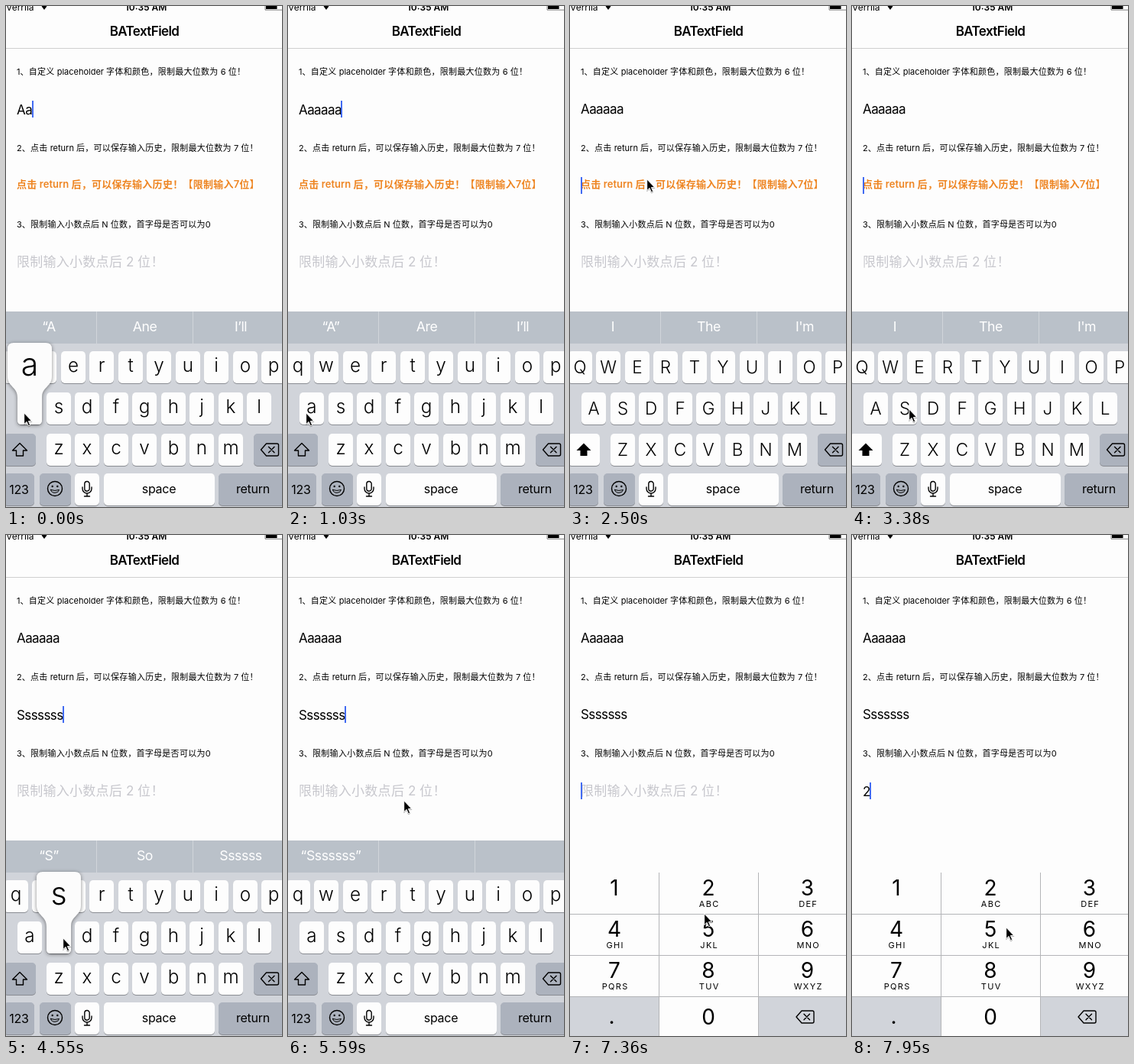
Recreate the animation shown at these times as an HTML page. Size 361x656 px, loop 8 s.

```html
<!DOCTYPE html>
<html lang="zh-CN">
<head>
<meta charset="utf-8">
<title>BATextField</title>
<style>
html, body { margin: 0; width: 100%; height: 100%; overflow: hidden; background: #fdfdfd; }
svg { display: block; width: 361px; height: 656px; }
text { font-family: Inter, "Noto Sans CJK SC", "Noto Sans CJK", sans-serif; white-space: pre; text-spacing-trim: space-all; }
.han { letter-spacing: .27px; }
.mid { text-anchor: middle; }
.field { font-size: 17px; letter-spacing: -.6px; }
.suggest { font-size: 17.7px; letter-spacing: -.45px; fill: #fff; }
.lower { font-size: 24.3px; font-weight: 350; }
.upper { font-size: 22.5px; font-weight: 350; }
.word { font-size: 16px; letter-spacing: -.25px; }
.digit { font-size: 28px; }
.abc { font-size: 11px; letter-spacing: 1.3px; }
.line { fill: none; stroke: #000; stroke-width: 1.4; stroke-linejoin: round; stroke-linecap: round; }
</style>
</head>
<body>
<svg id="stage" viewBox="0 0 361 656" xmlns="http://www.w3.org/2000/svg"></svg>
<script>
const LOOP = 8000;
const LEFT = 14;

const rect = (x, y, w, h, fill, more = '') =>
  `<rect x="${x}" y="${y}" width="${w}" height="${h}" fill="${fill}" ${more}/>`;
const text = (x, y, content, more = '') => `<text x="${x}" y="${y}" ${more}>${content}</text>`;
const path = (d, more) => `<path d="${d}" ${more}/>`;
const group = (id, content) => `<g id="${id}">${content}</g>`;

// Chinese runs are spaced slightly wider than Latin ones.
const mixed = (x, y, content, more) => text(x, y, content.replace(
  /[\u3000-\uffef]+/g, run => `<tspan class="han">${run}</tspan>`), more);

const key = (x, y, w, fill = '#fdfdfd') =>
  rect(x, y + 1, w, 42, '#898c92', 'rx="5"') + rect(x, y, w, 42, fill, 'rx="5"');

const backspace = (x, y) => `<g class="line" transform="translate(${x} ${y})">` +
  path('M-11.5 0L-4.5 -8H9.5Q11.5 -8 11.5 -6V6Q11.5 8 9.5 8H-4.5Z') +
  path('M-1.5 -3.8L6 3.8M6 -3.8L-1.5 3.8') + '</g>';

// Letter keys sit on whole pixels; each row starts at the given left edge.
const ROWS = [['qwertyuiop', -3.5, 452], ['asdfghjkl', 15.25, 506], ['zxcvbnm', 52.75, 560]];
const eachLetter = draw => ROWS.map(([letters, x, y]) =>
  [...letters].map((c, i) => draw(c, Math.round(x + 37.5 * i), y)).join('')).join('');
const SHIFT = 'M18 572.5L27.5 582H22.5V589H13.5V582H8.5Z';

function page() {
  const small = 'font-size="11"';
  return rect(0, 0, 361, 656, '#fdfdfd') + rect(0, 55, 361, 1, '#cfcfcf') +
    text(0, 5.5, 'Verrila', 'font-size="12"') +
    path('M45.5 -1A7 7 0 0 1 54.5 -1L50 5Z', '') +
    path('M45 1A7.2 7.2 0 0 1 55 1', 'fill="none" stroke="#fdfdfd" stroke-width="1"') +
    text(183, 5.5, '10:35 AM', 'class="mid" font-size="12" font-weight="600"') +
    rect(340, 0, 14.5, 4, '#000') + path('M339 0V5.2H361', 'fill="none" stroke="#000" stroke-width=".5"') +
    text(181, 39, 'BATextField', 'class="mid" font-size="17" font-weight="600" letter-spacing="-.6"') +
    mixed(LEFT, 90, '1、自定义 placeholder 字体和颜色，限制最大位数为 6 位！', small) +
    mixed(LEFT, 190, '2、点击 return 后，可以保存输入历史，限制最大位数为 7 位！', small) +
    mixed(LEFT, 290, '3、限制输入小数点后 N 位数，首字母是否可以为0', small) +
    group('hint2', mixed(LEFT, 237.5, '点击 return 后，可以保存输入历史！【限制输入7位】',
      'font-size="13" font-weight="600" fill="#ee8522"')) +
    group('hint3', mixed(LEFT, 341.3, '限制输入小数点后 2 位！', 'font-size="17" fill="#c7c7cd"')) +
    [1, 2, 3].map(i => text(LEFT, 0, '', `id="field${i}" class="field"`)).join('') +
    rect(0, 0, 2, 22, '#426bf2', 'id="caret"');
}

function letterBoard() {
  const dark = '#acb2bd';
  const label = (x, y, content) => text(x, y, content, 'class="mid word"');
  const mic = path('M106 622.5A3.2 3.2 0 0 1 109.2 625.7V632A3.2 3.2 0 0 1 102.8 632V625.7A3.2 3.2 0 0 1 106 622.5Z' +
    'M100 630V632A6 6 0 0 0 112 632V630M106 638V642M102.5 642H109.5', 'class="line"');
  const smile = '<circle cx="64" cy="632" r="9.5" class="line"/>' +
    '<circle cx="60.7" cy="629" r="1.2"/><circle cx="67.3" cy="629" r="1.2"/>' +
    path('M58.5 633.5Q64 635.5 69.5 633.5A5.6 4.8 0 0 1 58.5 633.5Z', 'class="line" style="stroke-width:1"');
  return rect(0, 400, 361, 256, '#d1d4da') + rect(0, 400, 361, 42, '#bac1c9') +
    rect(118, 400, 1, 42, '#d1d5da') + rect(244, 400, 1, 42, '#d1d5da') +
    [56, 181.5, 307].map((x, i) => text(x, 426, '', `id="suggest${i}" class="mid suggest"`)).join('') +
    eachLetter((c, x, y) => key(x, y, 32)) +
    group('lower', eachLetter((c, x, y) => text(x + 16, y + 27.2, c, 'class="mid lower"')) +
      key(-3, 560, 42, dark) + path(SHIFT, 'class="line"')) +
    group('upper', eachLetter((c, x, y) => text(x + 16, y + 29.3, c.toUpperCase(), 'class="mid upper"')) +
      key(-3, 560, 42) + path(SHIFT, '')) +
    key(324, 560, 42, dark) + backspace(345, 581) +
    key(-3, 612, 40, dark) + label(17, 639, '123') +
    key(44, 612, 41, dark) + smile +
    key(90, 612, 32) + mic +
    key(128, 612, 145) + label(200, 638, 'space') +
    key(278, 612, 90, dark) + label(323, 638, 'return');
}

function numberBoard() {
  const grey = '#d1d4da', rule = '#b4b5b8';
  const columns = [58, 181, 310.5];
  const captions = ['', 'ABC', 'DEF', 'GHI', 'JKL', 'MNO', 'PQRS', 'TUV', 'WXYZ'];
  const keys = captions.map((caption, i) => {
    const x = columns[i % 3], y = 442 + 54 * Math.floor(i / 3);
    return text(x, y + 30, i + 1, 'class="mid digit"') + text(x + 1.2, y + 45, caption, 'class="mid abc"');
  }).join('');
  return rect(0, 442, 361, 214, '#fdfdfd') + rect(117, 442, 129, 54, grey, 'id="pressed"') +
    rect(0, 605, 116, 51, grey) + rect(247, 605, 114, 51, grey) +
    [496, 550, 604].map(y => rect(0, y, 361, 1, rule)).join('') +
    [116, 246].map(x => rect(x, 442, 1, 214, rule)).join('') + keys +
    text(181, 641, '0', 'class="mid digit"') + text(54.5, 640, '.', 'class="mid digit"') + backspace(307.5, 631);
}

const popup = group('popup',
  path('M-21 441H21Q29 441 29 449V485C29 499 16 498 16 513V543Q16 548 11 548H-11Q-16 548 -16 543V513C-16 498 -29 499 -29 485V449Q-29 441 -21 441Z',
    'fill="#fcfcfc" style="filter:drop-shadow(0 1px 2.5px #0007)"') +
  text(0, 484, '', 'id="popupLetter" class="mid" font-size="41" font-weight="350"'));

const pointer = group('pointer', path('M.7 .9V15.6L4.1 12.4L6.4 17.8L8.7 16.8L6.4 11.6H10.8Z',
  'stroke="#fff" stroke-width="1" style="filter:drop-shadow(0 1px .7px #0005)"'));

const stage = document.getElementById('stage');
stage.innerHTML = page() + group('letters', letterBoard()) + group('numbers', numberBoard()) + popup + pointer;
const el = id => document.getElementById(id);

// Each track holds its value until the next step: [start, value].
const repeatTyping = (first, rest, times, from = 1) =>
  times.map((time, i) => [time, first + rest.repeat(i + from - 1)]);

const tracks = {
  field1: repeatTyping('A', 'a', [0, 300, 440, 590, 740], 2),
  field2: [[0, ''], ...repeatTyping('S', 's', [3680, 3820, 3970, 4110, 4260, 4400, 4550])],
  field3: [[0, ''], [7500, '2']],
  active: [[0, 1], [2360, 2], [5890, 3]],
  caret: [[0, 1], [1780, 0], [2360, 1], [2940, 0], [3230, 1], [6770, 0], [7210, 1]],
  board: [[0, 'lower'], [2360, 'upper'], [3820, 'lower'], [5890, 'numbers']],
  popup: [[0, 'a'], [150, ''], [300, 'a'], [1030, ''], [3680, 'S'], [3820, 's'], [5000, '']],
  pressed: [[0, 0], [7500, 1], [7650, 0]],
  suggest: [[0, ['“A', 'Ane', 'I’ll']], [150, ['“A”', 'Are', 'I’ll']], [1330, ['“Aaaaaa”', '', '']],
    [2360, ['I', 'The', 'I\'m']], [3820, ['“S”', 'So', 'Ssssss']], [5290, ['“Sssssss”', '', '']]],
  pointer: [[0, [23, 532]], [1330, [27, 518]], [1480, [50, 430]], [1630, [78, 318]], [1780, [97, 243]],
    [1920, [100, 226]], [2650, [102, 250]], [2790, [98, 345]], [2940, [85, 450]], [3090, [70, 515]],
    [3230, [65, 527]], [3380, [74, 527]], [5290, [92, 490]], [5440, [132, 395]], [5590, [151, 347]],
    [5740, [141, 340]], [5890, [135, 338]], [6480, [139, 350]], [6620, [154, 425]], [6770, [166, 510]],
    [6920, [171, 554]], [7060, [173, 540]], [7210, [174, 513]], [7350, [175, 495]], [7950, [201, 513]]]
};
const valueAt = (track, time) => track.findLast(([start]) => start <= time)[1];
const show = (id, on) => { el(id).style.display = on ? '' : 'none'; };

function draw(s) {
  for (const i of [1, 2, 3]) {
    const field = el('field' + i);
    field.textContent = s['field' + i];
    field.setAttribute('y', 41 + 100 * i + (s.active === i ? .5 : 0));
  }
  show('hint2', !s.field2);
  show('hint3', !s.field3);

  const typed = s['field' + s.active] ? Math.floor(el('field' + s.active).getComputedTextLength()) : 0;
  el('caret').setAttribute('x', LEFT + typed);
  el('caret').setAttribute('y', 24 + 100 * s.active);
  show('caret', s.caret);

  show('letters', s.board !== 'numbers');
  show('numbers', s.board === 'numbers');
  show('lower', s.board === 'lower');
  show('upper', s.board === 'upper');
  show('pressed', s.pressed);
  s.suggest.forEach((word, i) => { el('suggest' + i).textContent = word; });

  show('popup', s.popup);
  el('popup').setAttribute('transform', `translate(${s.popup === 'a' ? 31 : 69} 0)`);
  el('popupLetter').textContent = s.popup;
  el('pointer').setAttribute('transform', `translate(${s.pointer})`);
}

let shown = '';
function tick() {
  const time = performance.now() % LOOP;
  const state = Object.fromEntries(Object.entries(tracks).map(([name, track]) => [name, valueAt(track, time)]));
  const stamp = JSON.stringify(state);
  if (stamp !== shown) {
    draw(state);
    shown = stamp;
  }
  requestAnimationFrame(tick);
}
tick();
</script>
</body>
</html>
```
